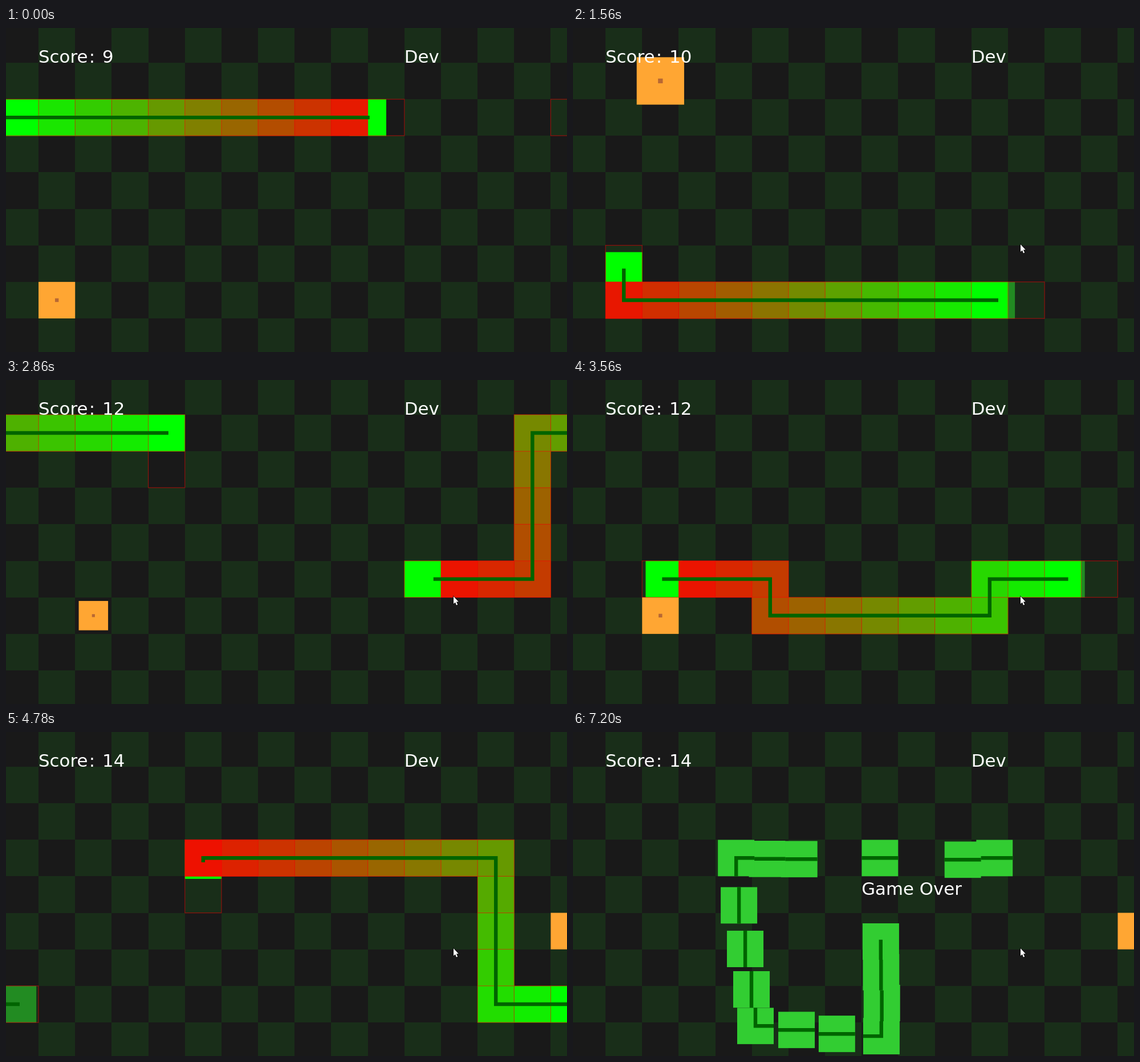
An HTML page with a canvas for the animation above (7220 ms loop, 984 px wide and 569 px high).

```html
<!DOCTYPE html>
<html lang="en">
<head>
<meta charset="utf-8">
<title>Snake</title>
<style>
html, body { margin: 0; width: 100%; height: 100%; overflow: hidden; background: #191919; }
canvas { display: block; }
</style>
</head>
<body>
<canvas id="stage" width="984" height="569"></canvas>
<script>
const ctx = document.getElementById('stage').getContext('2d');
const LOOP = 7220, CELL = 64.17, LEFT = -7.1, TOP = -3.3, COLS = 16, ROWS = 9;
const FONT_SIZE = 30.8;

// The snake's route in unwrapped cells; route index LEAD is step 0.
const LEAD = 11;
const MOVES = 'R16 D5 L14 U1 R3 U5 L6 D4 L3 D1 L6 U1 L3 D2 L5 U4 L8 D4 R3 U3';
const STEP = { R: [1, 0], L: [-1, 0], U: [0, -1], D: [0, 1] };
const route = [[-1, 2]];
for (const move of MOVES.split(' ')) {
  const [dx, dy] = STEP[move[0]];
  for (let i = 0; i < +move.slice(1); i++) {
    const [c, r] = route[route.length - 1];
    route.push([c + dx, r + dy]);
  }
}

// Time in ms against steps travelled.
const PACE = [[0, .483], [940, 15.888], [2140, 35.07], [3560, 57.888], [4780, 77.05], [5400, 87]];
const CRASH = 5400, LAST_STEP = 86;

// Food cells and the step at which each one is eaten.
const FOODS = [[1, 7, 24], [2, 1, 35], [11, 5, 46], [2, 6, 58], [13, 7, 64], [15, 5, Infinity]];

// How far each piece is thrown by the crash, tail first.
const THROWS = [
  [73, 0], [81.5, 3], [0, 0], [-78, 2], [-70, 1.5], [-60, 0], [-55, 19], [-44, 31.5],
  [-33, 38.5], [-26, 38.5], [-18, 45.5], [-11.5, 52.5], [2.5, 56.5], [3.3, 62.5], [2, 72.5], [1.5, 83]
];

const px = c => LEFT + c * CELL;
const py = r => TOP + r * CELL;
const mix = (a, b, t) => a + (b - a) * t;
const mixCell = (a, b, t) => [mix(a[0], b[0], t), mix(a[1], b[1], t)];
const mixColor = (a, b, t) => `rgb(${a.map((v, i) => Math.round(mix(v, b[i], t))).join()})`;
const at = step => route[step + LEAD];

const GREEN = [0, 255, 0], RED = [255, 0, 0], ORANGE = [255, 166, 51];

function stepsAt(t) {
  let i = 1;
  while (i < PACE.length - 1 && t > PACE[i][0]) i++;
  const [t0, s0] = PACE[i - 1], [t1, s1] = PACE[i];
  return mix(s0, s1, (t - t0) / (t1 - t0));
}

function timeOf(step) {
  const i = PACE.findIndex(p => p[1] >= step);
  const [t0, s0] = PACE[i - 1], [t1, s1] = PACE[i];
  return mix(t0, t1, (step - s0) / (s1 - s0));
}

function tile([c, r], color) {
  ctx.fillStyle = color;
  ctx.fillRect(px(c), py(r), CELL + .3, CELL + .3);
}

function strokeCells(cells) {
  ctx.beginPath();
  for (const [c, r] of cells) ctx.lineTo(px(c + .5), py(r + .5));
  ctx.strokeStyle = '#006400';
  ctx.lineWidth = CELL / 10;
  ctx.lineCap = 'square';
  ctx.lineJoin = 'miter';
  ctx.stroke();
}

function drawBoard() {
  for (let r = 0; r < ROWS; r++)
    for (let c = 0; c < COLS; c++) {
      ctx.fillStyle = (c + r) % 2 ? '#192e19' : '#191919';
      const x = Math.round(px(c)), y = Math.round(py(r));
      ctx.fillRect(x, y, Math.round(px(c + 1)) - x, Math.round(py(r + 1)) - y);
    }
}

function popScale(u) {
  if (u >= 1) return 1;
  const k = 3.4, v = u - 1;
  return 1 + (k + 1) * v ** 3 + k * v * v;
}

function drawFood(t, eaten) {
  const [c, r] = FOODS[eaten];
  const age = eaten ? t - timeOf(FOODS[eaten - 1][2]) : LOOP;
  const size = CELL * Math.max(0, popScale(age / 250));
  const square = (s, color) => {
    ctx.fillStyle = color;
    ctx.fillRect(px(c + .5) - s / 2, py(r + .5) - s / 2, s, s);
  };
  square(size, '#ffa633');
  square(size / 10, '#b86833');
}

function drawSnake(steps, length, eating) {
  const head = Math.floor(steps), p = steps - head;
  const tail = head - length + 1;
  const headPos = mixCell(at(head - 1), at(head), p);
  const tailPos = mixCell(at(tail - 1), at(tail), eating ? 1 : p);
  const body = [];
  for (let i = tail; i < head; i++) body.push(at(i));

  for (const shift of [0, COLS, 2 * COLS]) {
    ctx.save();
    ctx.translate(shift * CELL, 0);
    tile(tailPos, '#228b22');
    if (eating) tile(at(head), mixColor(ORANGE, GREEN, 1 - (1 - p) ** 4));
    else tile(headPos, 'rgb(0,255,0)');
    body.forEach((cell, i) => tile(cell, mixColor(GREEN, RED, i / (length - 1))));

    ctx.beginPath();
    for (const [c, r] of [at(tail - 1), ...body, at(head)]) ctx.rect(px(c), py(r), CELL, CELL);
    ctx.strokeStyle = 'rgba(255,0,0,.5)';
    ctx.lineWidth = 1.2;
    ctx.stroke();

    strokeCells([tailPos, ...body, headPos]);
    ctx.restore();
  }
}

function drawWreck(t) {
  const spread = 1 - Math.exp(-2.88 * (t - CRASH) / 1000);
  THROWS.forEach(([dx, dy], i) => {
    const step = LAST_STEP - THROWS.length + 1 + i;
    const cell = at(step), next = at(step + 1);
    const line = [mixCell(at(step - 1), cell, .5), cell];
    if (next) line.push(mixCell(cell, next, .5));
    ctx.save();
    ctx.translate(2 * COLS * CELL + dx * spread, dy * spread);
    ctx.beginPath();
    ctx.rect(px(cell[0]), py(cell[1]), CELL, CELL);
    ctx.clip();
    tile(cell, '#32cd32');
    strokeCells(line);
    ctx.restore();
  });
}

function drawText(score, over) {
  ctx.font = `${FONT_SIZE}px "DejaVu Sans", Verdana, sans-serif`;
  ctx.fillStyle = '#fff';
  ctx.fillText('Score', px(1), 60.8);
  ctx.fillText(':', px(1) + 88.7, 60.8);
  ctx.fillText(score, px(1) + 112, 60.8);
  ctx.fillText('Dev', px(11), 60.8);
  if (over) ctx.fillText('Game Over', px(8), 285.8);
}

// The pointer slides in from below and rests.
function drawPointer(t) {
  const u = Math.min(1, Math.max(0, (t - 300) / 400));
  if (!u) return;
  const ease = 1 - (1 - u) ** 2;
  ctx.save();
  ctx.translate(mix(805, 785, ease), mix(572, 380, ease));
  ctx.beginPath();
  for (const [x, y] of [[0, 0], [0, 13], [3, 10.4], [5, 15.5], [7.2, 14.6], [5, 9.6], [8.8, 9.6]]) ctx.lineTo(x, y);
  ctx.closePath();
  ctx.lineWidth = 1.2;
  ctx.strokeStyle = '#000';
  ctx.stroke();
  ctx.fillStyle = '#fff';
  ctx.fill();
  ctx.restore();
}

function draw(t) {
  const steps = stepsAt(t), over = t >= CRASH;
  const eaten = FOODS.filter(f => f[2] <= steps).length;
  const eating = FOODS.some(f => f[2] === Math.floor(steps));
  drawBoard();
  drawFood(t, eaten);
  if (over) drawWreck(t);
  else drawSnake(steps, LEAD + eaten, eating);
  drawText(9 + eaten, over);
  drawPointer(t);
}

const start = performance.now();
function tick() {
  draw((performance.now() - start) % LOOP);
  requestAnimationFrame(tick);
}
tick();
</script>
</body>
</html>
```
